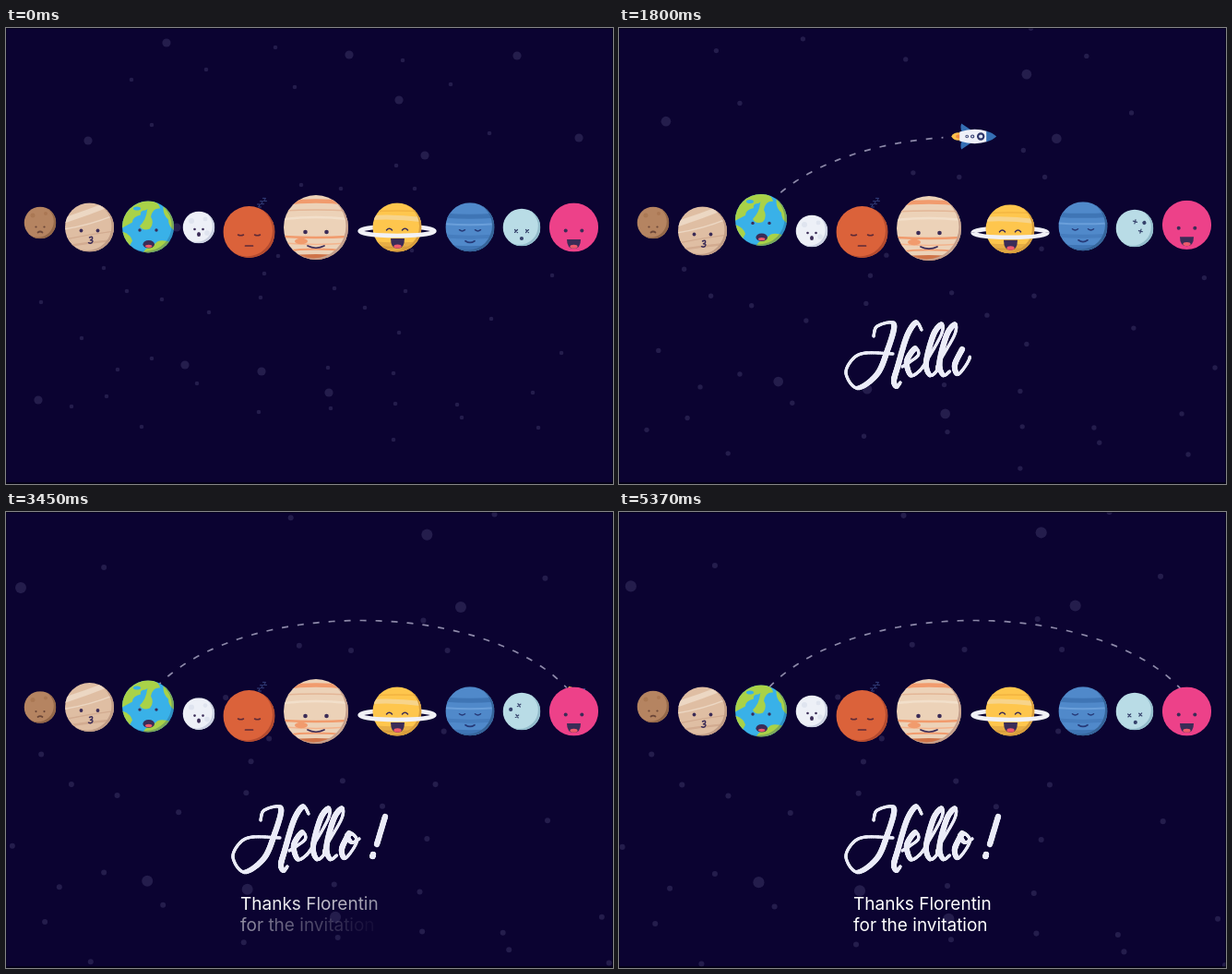
Write an HTML page with a canvas that moves like this. It is 658 by 494 pixels and loops after 5.4 s.

```html
<!DOCTYPE html>
<html lang="en">
<head>
<meta charset="utf-8">
<title>Hello planets</title>
<style>
  html, body { margin: 0; width: 100%; height: 100%; overflow: hidden; background: #0b0331; }
  canvas { display: block; position: absolute; left: 0; top: 0; }
  p { position: absolute; left: 254px; top: 414px; margin: 0; white-space: pre; color: #fff;
      font: 400 19px/22px Inter, "Open Sans", sans-serif; }
  p + p { top: 437px; }
</style>
</head>
<body>
<canvas id="stage" width="658" height="494" role="img" aria-label="Hello !"></canvas>
<p>Thanks Florentin</p>
<p>for the invitation</p>
<script>
const LOOP = 5400, W = 658, H = 494, TAU = 2 * Math.PI;
const ctx = document.getElementById('stage').getContext('2d');
const INK = '#3b2c57';
const clamp = v => Math.max(0, Math.min(1, v));

// ---- timing helpers
const smooth = k => (1 - Math.cos(Math.PI * k)) / 2;
const linear = k => k;
function track(t, keys, curve = smooth) {
  for (let i = 1; i < keys.length; i++) {
    const [t0, v0] = keys[i - 1], [t1, v1] = keys[i];
    if (t <= t1) return v0 + (v1 - v0) * curve(clamp((t - t0) / (t1 - t0)));
  }
  return keys[keys.length - 1][1];
}
const fastKeys = [[0, 0], [900, 1], [1800, -1], [2640, 1], [3600, -.75], [4400, .75], [LOOP, 0]];
const slowKeys = [[0, 0], [850, 1], [2500, -1], [4400, 1], [LOOP, 0]];
const venusKeys = [[0, 216], [900, 211.5], [1780, 220], [2550, 209], [3400, 211.5], [4250, 209], [LOOP, 216]];

// ---- drawing helpers
function oval(x, y, rx, ry, c) {
  ctx.fillStyle = c;
  ctx.beginPath();
  ctx.ellipse(x, y, rx, ry, 0, 0, TAU);
  ctx.fill();
}
const dot = (x, y, r, c = INK) => oval(x, y, r, r, c);
function line(d, w, c = INK) {
  ctx.strokeStyle = c;
  ctx.lineWidth = w;
  ctx.lineCap = ctx.lineJoin = 'round';
  ctx.stroke(new Path2D(d));
}
function fill(d, c) {
  ctx.fillStyle = c;
  ctx.fill(new Path2D(d));
}
// a stripe across the planet; bend lifts its middle, tilt its right end
const band = (y, w, c, bend = 2, tilt = 0) => line(`M-36 ${y}Q0 ${y - bend} 36 ${y - tilt}`, w, c);
const eyes = (x, y, r, c) => { dot(-x, y, r, c); dot(x, y, r, c); };
const lids = (x, y, bend, c) => line(`M${-x - 3} ${y}q3 ${bend} 6 0M${x - 3} ${y}q3 ${bend} 6 0`, 1.5, c);
const smile = (y, w, bend, c) => line(`M${-w} ${y}q${w} ${bend} ${2 * w} 0`, 1.7, c);
function laugh(y, w, h) {
  fill(`M${-w} ${y}H${w}Q${w} ${y + h} 0 ${y + h}Q${-w} ${y + h} ${-w} ${y}Z`, INK);
  oval(0, y + h * .78, w * .55, h * .2, '#ee5a6c');
}
function planet(x, y, r, color, shade, surface, face) {
  ctx.save();
  ctx.translate(x, y);
  ctx.save();
  ctx.beginPath();
  ctx.arc(0, 0, r, 0, TAU);
  ctx.clip();
  ctx.fillStyle = color;
  ctx.fillRect(-r, -r, 2 * r, 2 * r);
  if (surface) surface();
  if (shade) {
    ctx.beginPath();
    ctx.rect(-r, -r, 2 * r, 2 * r);
    ctx.arc(-2.5, -1.5, r, 0, TAU);
    ctx.fillStyle = shade;
    ctx.fill('evenodd');
  }
  ctx.restore();
  face();
  ctx.restore();
}

// ---- stars
const bigStars = [174,16, 372,29, 426,78, 554,30, 621,119, 454,138, 89,122, 185,216, 35,403, 194,365, 277,372, 350,395];
const smallStars = [217,45, 292,21, 313,64, 136,56, 158,105, 430,35, 482,61, 524,114, 423,149, 443,174,
  320,170, 363,174, 259,213, 440,241, 592,268, 106,260, 131,285, 169,294, 220,308, 38,297, 82,336, 121,370,
  158,358, 207,385, 71,410, 109,399, 147,432, 280,266, 295,247, 276,292, 356,282, 389,303, 349,368, 352,412,
  274,416, 433,285, 426,330, 420,374, 422,407, 420,446, 526,315, 602,352, 571,395, 577,433, 489,408, 494,422];
function stars(t) {
  const s = 1 + .32 * Math.min(1, t / 3600);
  for (const [list, r] of [[bigStars, 4.6], [smallStars, 2.3]])
    for (let i = 0; i < list.length; i += 2)
      dot(327 + (list[i] - 327) * s, 252 + (list[i + 1] - 252) * s, r * s, '#241d4c');
}

// ---- rocket and its dashed trail
function orbit(u) {
  const v = 1 - u;
  return [v * v * v * 154 + 3 * v * v * u * 240 + 3 * v * u * u * 530 + u * u * u * 616, 200 - 330 * u * v];
}
const flight = [[300, 0], [960, .195], [1800, .5], [2460, .73], [3450, 1.03], [3560, 1.06]];
function rocket(t) {
  const u = track(t, flight, linear), end = Math.min(.975, u - .06);
  if (end > 0) {
    ctx.beginPath();
    for (let i = 0; i <= 120; i++) ctx.lineTo(...orbit(end * i / 120));
    ctx.setLineDash([7, 10]);
    ctx.lineDashOffset = -13.5;
    ctx.lineCap = 'butt';
    ctx.lineWidth = 1.7;
    ctx.strokeStyle = '#8c88a8';
    ctx.stroke();
    ctx.setLineDash([]);
  }
  if (t < 300 || t > 3560) return;
  const [x, y] = orbit(u), [x2, y2] = orbit(u + .002);
  ctx.save();
  ctx.translate(x, y);
  ctx.rotate(Math.atan2(y2 - y, x2 - x));
  fill('M-15 -4Q-22 -5 -25 0Q-22 5 -15 4Z', '#fdc04b');
  oval(-16, 0, 4, 2.2, '#f08a45');
  for (const s of [-1, 1]) fill(`M-2 ${6 * s}L-14 ${14 * s}Q-16 ${9 * s} -13 ${4 * s}Z`, '#356fb4');
  fill('M-16 -5Q0 -10 14 -5.5V5.5Q0 10 -16 5Z', '#eef0f8');
  fill('M13 -5.8Q20 -4 24 0Q20 4 13 5.8Z', '#356fb4');
  for (const [wx, r] of [[7, 4.2], [-2, 2.1], [-8, 1.8]]) {
    dot(wx, 0, r, '#2c3468');
    dot(wx, 0, r / 2, '#dfe8f6');
  }
  ctx.restore();
}

// ---- planets
function planets(t) {
  const fast = track(t, fastKeys), slow = track(t, slowKeys);

  planet(37, 215 - 4 * Math.cos(TAU * t / 1800), 17.3, '#b58461', '#946849', () => {
    dot(-8, -8, 2.5, '#aa7854');
    dot(6, -10, 2, '#aa7854');
  }, () => {
    eyes(4.5, 4.5, 1.1, '#6b4638');
    smile(10.5, 2.5, -2, '#6b4638');
  });

  planet(90.5, track(t, venusKeys), 26.5, '#dfbea3', '#c19d86', () => {
    band(-5, 6, '#ecd7c3', 11, 26);
    band(3, 1.6, '#ecd7c3', 4, 20);
    band(15, 1.4, '#d2ab90', 8, 12);
    band(22, 2.4, '#d2ab90', 6, 9);
  }, () => {
    eyes(9, 3.5, 1.9);
    line('M0 11q4 -2 3 1.5q-1 1.2 -2 1.2q4 .4 1.5 3q-1.5 1 -3.5 0', 1.5);
  });

  planet(154, 215.5 + 7.6 * fast, 28, '#39b1e8', 'rgba(30,80,120,.32)', () => {
    fill('M-27 -13Q-20 -30 2 -30Q6 -22 -3 -18Q-9 -18 -8 -13Q-17 -11 -17 -5L-30 2Z', '#a9d248');
    fill('M3 -29Q12 -27 13 -20Q5 -21 3 -11Q7 -4 2 2Q-6 5 -9 -1Q-2 -8 -1 -18Z', '#a9d248');
    fill('M17 -24L30 -10L29 4Q22 0 22 -8Q15 -14 17 -24Z', '#a9d248');
    fill('M-28 5Q-19 8 -17 15L-22 24L-31 12Z', '#a9d248');
    fill('M-7 30Q-1 20 8 18Q12 12 26 17L14 32Z', '#a9d248');
    oval(-12, -20, 4, 2, '#39b1e8');
  }, () => {
    eyes(9, 3.5, 1.7);
    oval(.7, 18.8, 6.3, 4.3, INK);
    oval(.7, 20.8, 3.7, 1.6, '#ee5a6c');
  });

  planet(209, 216 - 4 * fast, 17.3, '#edf0f7', '#cbd1e1', () => {
    dot(-8, -7, 3, '#dfe4ef');
    dot(7, -9, 2.4, '#dfe4ef');
    dot(9, 6, 2.8, '#dfe4ef');
  }, () => {
    eyes(4.5, 2, 1.3);
    oval(0, 7.5, 2, 2.6, INK);
  });

  planet(263.5, 221, 28, '#db623a', '#b44b2f', null, () => {
    lids(9, 3, 1.6, '#5d2a37');
    smile(15, 4, 0, '#5d2a37');
  });
  for (let i = 0; i < 3; i++) line(`M${272.5 + 3 * i} ${191 - 3.3 * i}h3l-2 3h3`, 1, '#34407c');

  planet(336, 216 - 4 * slow, 35, '#ecd2b8', '#c5a08c', () => {
    band(-26, 4.5, '#f19b6d', 5);
    band(-18, 1.6, '#e3b697');
    band(-9, 2.5, '#f2dfca', 4);
    band(10, 2.5, '#f19b6d', -2);
    band(17, 1.5, '#f3b48d', -3);
    band(26, 1.8, '#f19b6d', 5);
    band(34, 6, '#cf7449', 4);
    oval(-16, 15, 7, 3.2, '#f19b6d');
  }, () => {
    eyes(11.5, 5, 2.3);
    smile(20, 9, 4.5);
  });

  const saturnY = 216 - 7.8 * slow;
  const ring = from => {
    ctx.beginPath();
    ctx.ellipse(424, saturnY + 4, 40.5, 5, 0, from, from + Math.PI);
    ctx.lineWidth = 4.5;
    ctx.strokeStyle = '#f1f1f6';
    ctx.lineCap = 'butt';
    ctx.stroke();
  };
  ring(Math.PI);
  planet(424, saturnY, 26.5, '#fec64d', '#d69c3c', () => {
    band(-10, 5, '#f7d48b', 3, -3);
    band(-17, 1.4, '#f3b440');
    band(21, 13, '#e7ae45', -4);
    band(20, 2, '#d69c3c', -4);
  }, () => lids(8.5, 3, -3.5));
  ring(0);
  ctx.save();
  ctx.translate(424.5, saturnY);
  laugh(12, 7.5, 11);
  ctx.restore();

  planet(503, 215.7 + 3.8 * slow, 26.5, '#5089ca', '#356499', () => {
    band(-13, 5, '#3f75b5', -3);
    band(-4, 2, '#6a9fda', -3);
    band(9, 4, '#467dbe', -4);
    band(23, 9, '#3f75b5', -4);
  }, () => {
    lids(8.5, 3, 2.5, '#263a78');
    smile(15, 5, 3.5, '#263a78');
  });

  planet(559, 216 - 4 * slow, 20.3, '#b9dce6', '#93bccb', null, () => {
    ctx.rotate(2 * TAU * t / LOOP);
    for (const x of [-7.5, 4.5]) line(`M${x} 2.5l3 3m0 -3l-3 3`, 1.2, '#35416b');
    dot(0, 12, 2.1, '#35416b');
  });

  planet(615.5, 216 + 11.3 * slow, 26.6, '#ed4189', null, null, () => {
    eyes(8.8, 3.5, 2);
    laugh(13, 7.5, 10);
  });
}

// ---- brush lettering
const ell = x => [[0, 363], [17, 333], [18, 321], [9, 332], [1, 362], [5, 376], [12, 372]].map(p => [p[0] + x, p[1]]);
const stem = [[276, 334], [280, 323], [298, 321], [290, 352], [279, 376], [258, 390], [246, 374], [254, 358],
  [268, 352], [297, 353]];
const post = [[328, 327], [322, 319], [312, 334], [302, 367], [298, 382], [301, 389], [305, 384]];
const vowel = [[307, 367], [324, 355], [321, 347], [312, 361], [316, 376], [324, 373]];
const round = [[372, 348], [364, 365], [368, 375], [380, 358], [376, 349], [370, 351], [375, 358], [383, 354]];
const stroke = (from, to, p) => ({ from, to, pts: spline(p) });
const strokes = [
  stroke(150, 620, stem),
  stroke(460, 740, post),
  stroke(740, 1680, [...vowel, ...ell(332), ...ell(346.5)]),
  stroke(1650, 1980, round),
  stroke(2130, 2280, [[411, 330], [402, 360]]),
  stroke(2310, 2330, [[398, 371], [397.5, 373]])
];
function spline(p) {
  const out = [], n = p.length, N = 14;
  const mix = (a, b, c, d, k) =>
    .5 * (2 * b + (c - a) * k + (2 * a - 5 * b + 4 * c - d) * k * k + (3 * b - a - 3 * c + d) * k * k * k);
  for (let i = 0; i < n - 1; i++) {
    const a = p[Math.max(0, i - 1)], b = p[i], c = p[i + 1], d = p[Math.min(n - 1, i + 2)];
    for (let j = 0; j < N; j++)
      out.push([0, 1].map(m => mix(a[m], b[m], c[m], d[m], j / N)));
  }
  out.push(p[n - 1]);
  return out;
}
function lettering(t) {
  ctx.strokeStyle = '#ebecf8';
  ctx.lineCap = 'round';
  for (const { from, to, pts } of strokes) {
    const count = Math.floor(clamp((t - from) / (to - from)) * (pts.length - 1));
    for (let i = 1; i <= count; i++) {
      const [x0, y0] = pts[i - 1], [x1, y1] = pts[i];
      const dx = x1 - x0, dy = y1 - y0, down = (dy * .95 - dx * .3) / Math.hypot(dx, dy);
      // the pen presses harder on the way down
      ctx.lineWidth = 3.3 + 2.9 * Math.max(0, down);
      ctx.beginPath();
      ctx.moveTo(x0, y0);
      ctx.lineTo(x1, y1);
      ctx.stroke();
    }
  }
}

// ---- caption, faded in letter by letter
const letters = [];
for (const p of document.querySelectorAll('p')) {
  const text = p.textContent;
  p.textContent = '';
  for (const ch of text) {
    const span = document.createElement('span');
    span.textContent = ch;
    p.append(span);
    letters.push(span);
  }
}
function caption(t) {
  letters.forEach((s, i) => {
    s.style.color = `rgba(255,255,255,${clamp((t - 2635 - i * 23.5) / 810).toFixed(3)})`;
  });
}

function frame() {
  const t = performance.now() % LOOP;
  ctx.fillStyle = '#0b0331';
  ctx.fillRect(0, 0, W, H);
  stars(t);
  rocket(t);
  planets(t);
  lettering(t);
  caption(t);
  ctx.lineWidth = 1;
  ctx.strokeStyle = 'rgba(0,0,10,.5)';
  ctx.strokeRect(.5, .5, W - 1, H - 1);
  ctx.fillStyle = 'rgba(0,0,10,.6)';
  ctx.fillRect(0, H - 2, W, 2);
  requestAnimationFrame(frame);
}
frame();
</script>
</body>
</html>
```
